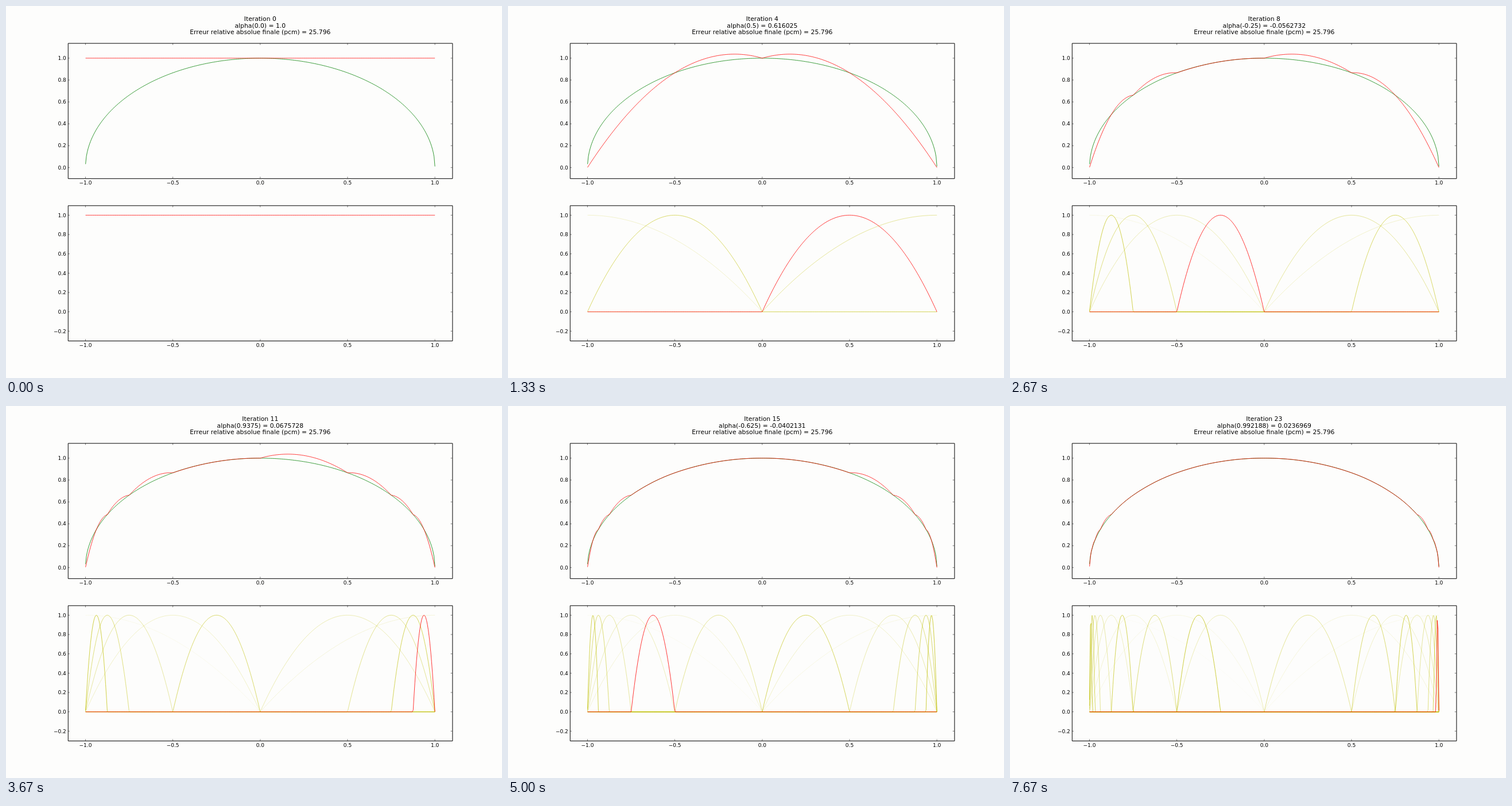
These frames come from a looping animation (864 px wide and 648 px high, 8000 ms). An HTML page with a canvas:

```html
<!DOCTYPE html>
<html lang="fr">
<head>
<meta charset="utf-8">
<title>Interpolation adaptative</title>
<style>
html, body { margin: 0; width: 100%; height: 100%; overflow: hidden; background: #fdfdfc; }
canvas { display: block; }
</style>
</head>
<body>
<canvas id="stage" width="864" height="648"></canvas>
<script>
const ctx = document.getElementById('stage').getContext('2d');
const FONT = '"DejaVu Sans", sans-serif';
const LOOP = 8000;

// Nodes of the hierarchical quadratic basis, in order of refinement
const nodes = [0, -1, 1, -.5, .5, -.75, .75, -.875, -.25, .875, -.9375, .9375,
  .25, -.96875, .96875, -.625, .625, -.984375, .984375, -.8125, .8125,
  -.9921875, -.375, .9921875];

const f = x => Math.sqrt(1 - x * x);

function basis(c, x) {
  if (c === 0) return 1;
  let h = 1;
  while (c / h % 1) h /= 2;
  return Math.max(0, 1 - ((x - c) / h) ** 2);
}

const alphas = [];
const interp = (x, n) =>
  alphas.slice(0, n + 1).reduce((sum, a, i) => sum + a * basis(nodes[i], x), 0);
nodes.forEach((c, i) => alphas.push(f(c) - interp(c, i)));

const xs = Array.from({ length: 419 }, (_, i) => -.9995 + i * 1.99945 / 418);

const LEFT = 108, RIGHT = 777.6, MID = (LEFT + RIGHT) / 2;
const px = x => MID + x * (RIGHT - LEFT) / 2.2;

function makePlot(top, min, max, firstTick) {
  const height = 235.636, bottom = top + height;
  const py = y => bottom - (y - min) * height / (max - min);
  return { top, bottom, py, firstTick };
}
const upper = makePlot(64.8, -.1, 1.1368, 0);
const lower = makePlot(347.564, -.3, 1.1, -1);

function text(str, x, y, size, align) {
  ctx.font = size + 'px ' + FONT;
  ctx.textAlign = align;
  ctx.fillStyle = '#000';
  ctx.fillText(str, x, y);
}

function curve(plot, fn, color, opacity = 1) {
  ctx.globalAlpha = opacity;
  ctx.strokeStyle = color;
  ctx.lineWidth = .78;
  ctx.lineJoin = 'round';
  ctx.beginPath();
  for (const x of xs) ctx.lineTo(px(x), plot.py(fn(x)));
  ctx.stroke();
  ctx.globalAlpha = 1;
}

function segment(x, y, dx, dy) {
  ctx.moveTo(x, y);
  ctx.lineTo(x + dx, y + dy);
}

const tickLabel = v => v.toFixed(1).replace('-', '\u2212');

function axes({ top, bottom, py, firstTick }) {
  ctx.strokeStyle = '#000';
  ctx.lineWidth = .5;
  ctx.beginPath();
  for (let x = -1; x <= 1; x += .5) {
    segment(px(x), top, 0, 3);
    segment(px(x), bottom, 0, -3);
    text(tickLabel(x), px(x), bottom + 10.9, 9, 'center');
  }
  for (let i = firstTick; i <= 5; i++) {
    const y = py(i / 5);
    segment(LEFT, y, 3, 0);
    segment(RIGHT, y, -3, 0);
    text(tickLabel(i / 5), LEFT - 3.2, y + 3.2, 9, 'right');
  }
  ctx.stroke();
  ctx.lineWidth = 1;
  ctx.strokeRect(LEFT + .27, top + .27, RIGHT - LEFT, bottom - top);
}

// Six significant digits, always with a decimal part
function number(v) {
  const n = +v.toPrecision(6);
  return Number.isInteger(n) ? n.toFixed(1) : String(n);
}

function draw(n) {
  ctx.fillStyle = '#fdfdfc';
  ctx.fillRect(0, 0, 864, 648);

  [`Iteration ${n}`,
    `alpha(${number(nodes[n])}) = ${number(alphas[n])}`,
    'Erreur relative absolue finale (pcm) = 25.796'
  ].forEach((line, i) => text(line, MID, 25.6 + i * 11.9, 10.8, 'center'));

  curve(upper, f, '#007f00');
  curve(upper, x => interp(x, n), '#f00');
  for (let k = 0; k < n; k++) curve(lower, x => basis(nodes[k], x), '#bfbf00', k / n);
  curve(lower, x => basis(nodes[n], x), '#f00');
  axes(upper);
  axes(lower);
}

let start, shown = -1;
function tick(now) {
  start ??= now;
  const t = (now - start) % LOOP;
  // Three steps per second, on a 10 ms clock
  const n = Math.floor((Math.floor(t / 10) + .5) * .03);
  if (n !== shown) draw(shown = n);
  requestAnimationFrame(tick);
}
draw(0);
requestAnimationFrame(tick);
</script>
</body>
</html>
```
